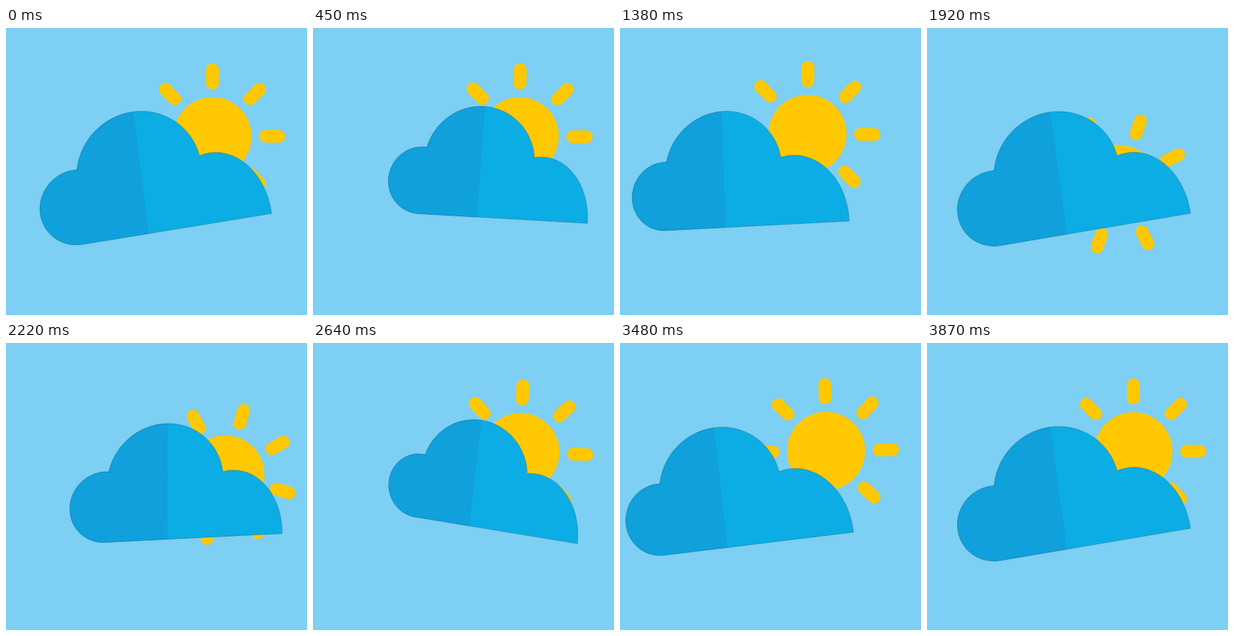
These frames come from a looping animation (400 by 381 pixels, 3900 ms). An HTML page with a canvas:

```html
<!DOCTYPE html>
<html lang="en">
<head>
<meta charset="utf-8">
<title>Sun and cloud</title>
<style>
html, body { margin: 0; width: 100%; height: 100%; overflow: hidden; background: #7dcff3; }
canvas { display: block; }
</style>
</head>
<body>
<canvas id="stage" width="400" height="381"></canvas>
<script>
const ctx = document.getElementById('stage').getContext('2d');
const LOOP = 3900, SWAY = LOOP / 2, STEP = 30, TURN = 2 * Math.PI, RAD = TURN / 360;

// Periodic swing that is highest at the peak time
const wave = (t, peak, period = SWAY) => Math.cos(TURN * (t - peak) / period);

// Single soft swell with its own rise and fall widths
const swell = (t, peak, rise, fall = rise) =>
  Math.exp(-(((t - peak) / (t < peak ? rise : fall)) ** 2));

function arc(x, y, rx, ry, from, to) {
  return Array.from({ length: 41 }, (_, i) => {
    const a = (from + (to - from) * i / 40) * RAD;
    return [x + rx * Math.cos(a), y + ry * Math.sin(a)];
  });
}

// Cloud outline: the fold runs from (0,0) to (0,1), the right tip is (1,0)
const leftHalf = [
  ...arc(-.541, .304, .305, .304, 270, 83),
  ...arc(-.018, .494, .504, .504, 167.5, 88)
];
const rightHalf = [
  ...arc(-.018, .494, .504, .504, 88, 8),
  ...arc(.56, 0, .44, .568, 100.5, 0)
];

// The sun leans right, swings left, dips behind the cloud, comes up and recoils
function drawSun(t) {
  const lean = swell(t, 850, 300);
  const recoil = swell(t, 3050, 350);
  const x = 274.3 + 2 * lean - 38 * swell(t, 1610, 360, 400)
    + 23 * swell(t, 2290, 220) - 2 * recoil;
  const y = 143.8 - 4.5 * swell(t, 1380, 150)
    + 64 * swell(t, 1880, 254, 397) - 2 * recoil;
  const angle = 3 * lean + 20 * swell(t, 1990, 300, 487) - 5 * recoil;

  ctx.save();
  ctx.translate(x, y);
  ctx.rotate(angle * RAD);
  ctx.fillStyle = ctx.strokeStyle = '#ffc800';
  ctx.lineWidth = 17;
  ctx.lineCap = 'round';
  ctx.beginPath();
  ctx.arc(0, 0, 52, 0, TURN);
  ctx.fill();
  for (let i = 0; i < 8; i++) {
    ctx.beginPath();
    ctx.moveTo(70.5, 0);
    ctx.lineTo(88.5, 0);
    ctx.stroke();
    ctx.rotate(TURN / 8);
  }
  ctx.restore();
}

function drawCloud(t) {
  // Foot of the fold, right axis, up axis and perspective
  const ox = 181.3 + 39 * wave(t, 440) + 2.5 * wave(t, 0, SWAY / 2);
  const oy = 259 + 17 * wave(t, 1760);
  const ux = 156 + 12.5 * wave(t, 1650);
  const uy = -2 + 28 * wave(t, 820);
  const vx = -1 + 22 * wave(t, 790) + 4 * wave(t, 284, SWAY / 2);
  const vy = -151.5 + 12 * wave(t, 820);
  const k = -.038 + .043 * wave(t, 145);

  const trace = points => {
    ctx.beginPath();
    for (const [x, y] of points) {
      const w = 1 + k * x, r = x * (1 + k);
      ctx.lineTo(ox + (r * ux + y * vx) / w, oy + (r * uy + y * vy) / w);
    }
    ctx.closePath();
  };
  trace([...leftHalf, ...rightHalf]);
  ctx.fillStyle = '#0cade4';
  ctx.fill();
  trace([...leftHalf, [0, 0]]);
  ctx.fillStyle = '#10a0db';
  ctx.fill();
  trace([...leftHalf, ...rightHalf]);
  ctx.strokeStyle = 'rgba(20, 95, 125, .55)';
  ctx.lineWidth = .7;
  ctx.stroke();
}

const start = performance.now();
function frame() {
  const elapsed = (performance.now() - start) % LOOP;
  const time = Math.floor(elapsed / STEP) * STEP;
  ctx.fillStyle = '#7dcff3';
  ctx.fillRect(0, 0, 400, 381);
  drawSun(time);
  drawCloud(time);
  requestAnimationFrame(frame);
}
frame();
</script>
</body>
</html>
```
